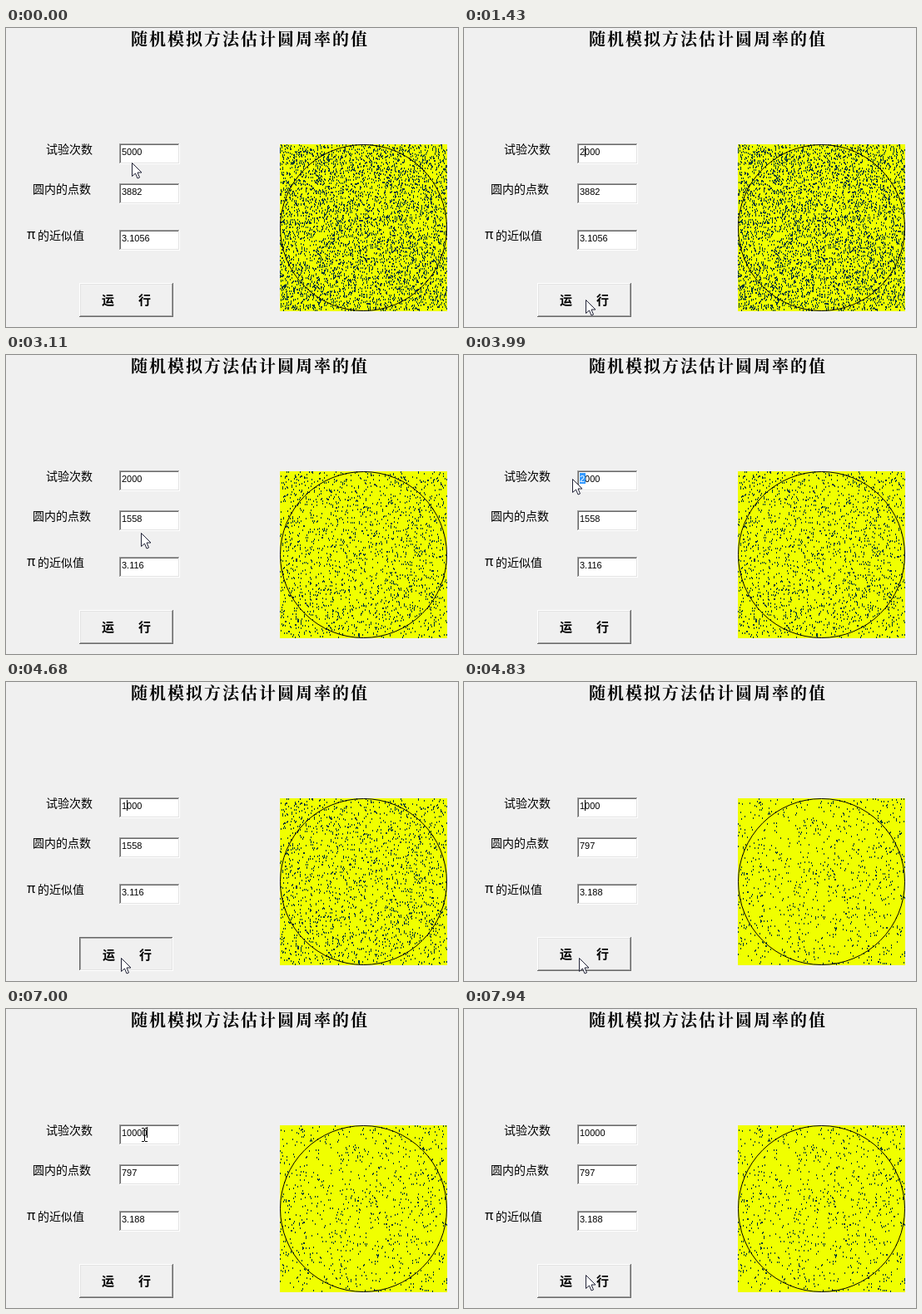
Animation, 543 px wide and 360 px high, one loop 8000 ms. Source, as an HTML page with a canvas:

```html
<!DOCTYPE html>
<html lang="zh">
<head>
<meta charset="utf-8">
<title>随机模拟方法估计圆周率的值</title>
<style>
html, body { margin: 0; width: 543px; height: 360px; overflow: hidden; background: #f0f0f0; }
canvas { display: block; }
</style>
</head>
<body>
<canvas id="stage" width="543" height="360"></canvas>
<script>
const ctx = document.getElementById('stage').getContext('2d');
const CJK = '"Noto Sans CJK SC", "Noto Sans CJK", sans-serif';
const TITLE = 'bold 20px "Noto Serif CJK SC", ' + CJK;
const LABEL = '14px ' + CJK;
const BUTTON = 'bold 15px ' + CJK;
const VALUE = '11px "Liberation Sans", sans-serif';
const LOOP = 8000;

// Each step inherits whatever it does not set from the step before.
const steps = [];
function add(time, x, y, more) {
  const last = steps[steps.length - 1] || {};
  steps.push({ ...last, time, x: x ?? last.x, y: y ?? last.y, ...more });
}
function run(start, end, list) {
  list.forEach((s, i) => add(start + (end - start) * i / (list.length - 1), ...s));
}

const beam = { beam: true }, arrow = { beam: false };
const on = { caret: 1 }, off = { caret: 0 };
const select = { caret: 0, selected: true };
const typed = trials => ({ trials, caret: 1, selected: false });

add(0, 151, 162, { trials: '5000', hits: '3882', pi: '3.1056', dots: 5000, caret: 0 });
add(150, 153, 150, beam);
add(280, 150, 150, on);
run(550, 1430, [
  [145, 150], [134, 150, select], [131, 150, arrow], [132, 190, typed('2000')],
  [138, 240], [144, 300], [146, 327]
]);
add(1700, null, null, off);
add(2130, null, null, on);
run(2410, 3420, [
  [148, 336, { pressed: true, caret: 0 }],
  [148, 336, { pressed: false, hits: '1558', pi: '3.116', dots: 2000 }],
  [152, 310], [158, 262], [162, 214], [158, 172], [150, 150, { ...beam, ...on }]
]);
run(3540, 4380, [
  [148, 150], [138, 150, select], [128, 150, arrow], [130, 149],
  [130, 190, typed('1000')], [134, 270], [138, 332]
]);
add(4680, null, null, { pressed: true });
add(4830, null, null, { pressed: false, hits: '797', pi: '3.188', dots: 1000 });
run(5230, 6225, [
  [146, 300], [160, 255], [174, 205], [172, 170], [163, 152, beam],
  [166, 152], [168, 151, { caret: 4 }], [166, 151]
]);
run(6850, 7790, [
  [166, 151, { trials: '10000', caret: 5 }], [160, 165, arrow], [158, 190],
  [154, 225, off], [150, 262], [148, 295], [148, 315]
]);
add(7940, 146, 320);

function rect(color, x, y, w, h) {
  ctx.fillStyle = color;
  ctx.fillRect(x, y, w, h);
}
function text(str, x, y, font, color = '#000') {
  ctx.font = font;
  ctx.fillStyle = color;
  ctx.fillText(str, x, y);
}
// Two-pixel bevel: outer and inner colours for the lit and the far edges.
function bevel(x, y, w, h, face, [a, b, c, d]) {
  rect(c, x, y, w, h);
  rect(a, x, y, w - 1, h - 1);
  rect(d, x + 1, y + 1, w - 2, h - 2);
  rect(b, x + 1, y + 1, w - 3, h - 3);
  rect(face, x + 2, y + 2, w - 4, h - 4);
}
function field(y, value) {
  bevel(136, y, 73, 25, '#fff', ['#a0a0a0', '#696969', '#fff', '#e3e3e3']);
  text(value, 139, y + 14, VALUE);
}

function button(pressed) {
  const d = pressed ? 1 : 0;
  bevel(88, 307, 113, 41, '#f0f0f0', pressed
    ? ['#696969', '#a0a0a0', '#fff', '#e3e3e3']
    : ['#fff', '#e3e3e3', '#696969', '#a0a0a0']);
  text('运', 115 + d, 333 + d, BUTTON);
  text('行', 159 + d, 333 + d, BUTTON);
}

function randomFrom(seed) {
  return () => {
    seed = seed + 0x6D2B79F5 | 0;
    let t = Math.imul(seed ^ seed >>> 15, 1 | seed);
    t = t + Math.imul(t ^ t >>> 7, 61 | t) ^ t;
    return ((t ^ t >>> 14) >>> 0) / 2 ** 32;
  };
}
function plot(count) {
  const random = randomFrom(count);
  rect('#f0ff00', 329, 140, 201, 201);
  for (let i = 0; i < count; i++) {
    const x = Math.floor(random() * 201), y = Math.floor(random() * 200);
    rect('#003838', 329 + x, 140 + y, 1, 2);
  }
  ctx.strokeStyle = '#000';
  ctx.lineWidth = 1;
  ctx.beginPath();
  ctx.arc(429.5, 240.5, 100, 0, Math.PI * 2);
  ctx.stroke();
}

const arrowShape = new Path2D('M0 0V16L4 12.5L6.5 18.5L9 17.5L6.5 11.5H11.5Z');
function pointer({ x, y, beam }) {
  if (beam) {
    rect('#000', x, y - 7, 1, 15);
    for (const edge of [y - 8, y + 8]) {
      rect('#000', x - 3, edge, 3, 1);
      rect('#000', x + 1, edge, 3, 1);
    }
    return;
  }
  ctx.save();
  ctx.translate(x + .5, y + .5);
  ctx.fillStyle = '#fff';
  ctx.strokeStyle = '#222438';
  ctx.fill(arrowShape);
  ctx.stroke(arrowShape);
  ctx.restore();
}

function draw(s) {
  rect('#f0f0f0', 0, 0, 543, 360);
  ctx.letterSpacing = '2px';
  text('随机模拟方法估计圆周率的值', 150, 21, TITLE);
  ctx.letterSpacing = '0px';
  text('试验次数', 48, 151, LABEL);
  text('圆内的点数', 32, 199, LABEL);
  text('π', 25, 254, '16px ' + CJK);
  text('的近似值', 38, 255, LABEL);

  field(139, s.trials);
  field(187, s.hits);
  field(243, s.pi);
  if (s.selected) {
    rect('#3399ff', 139, 142, 7, 13);
    text(s.trials[0], 139, 153, VALUE, '#fff');
  }
  if (s.caret) rect('#000', Math.floor(139 + s.caret * 6.15), 142, 1, 13);

  button(s.pressed);
  plot(s.dots);
  pointer(s);
}

let shown;
function frame(now) {
  const t = now % LOOP;
  const step = steps.findLast(s => s.time <= t);
  if (step !== shown) draw(shown = step);
  requestAnimationFrame(frame);
}
draw(shown = steps[0]);
requestAnimationFrame(() => frame(performance.now()));
</script>
</body>
</html>
```
